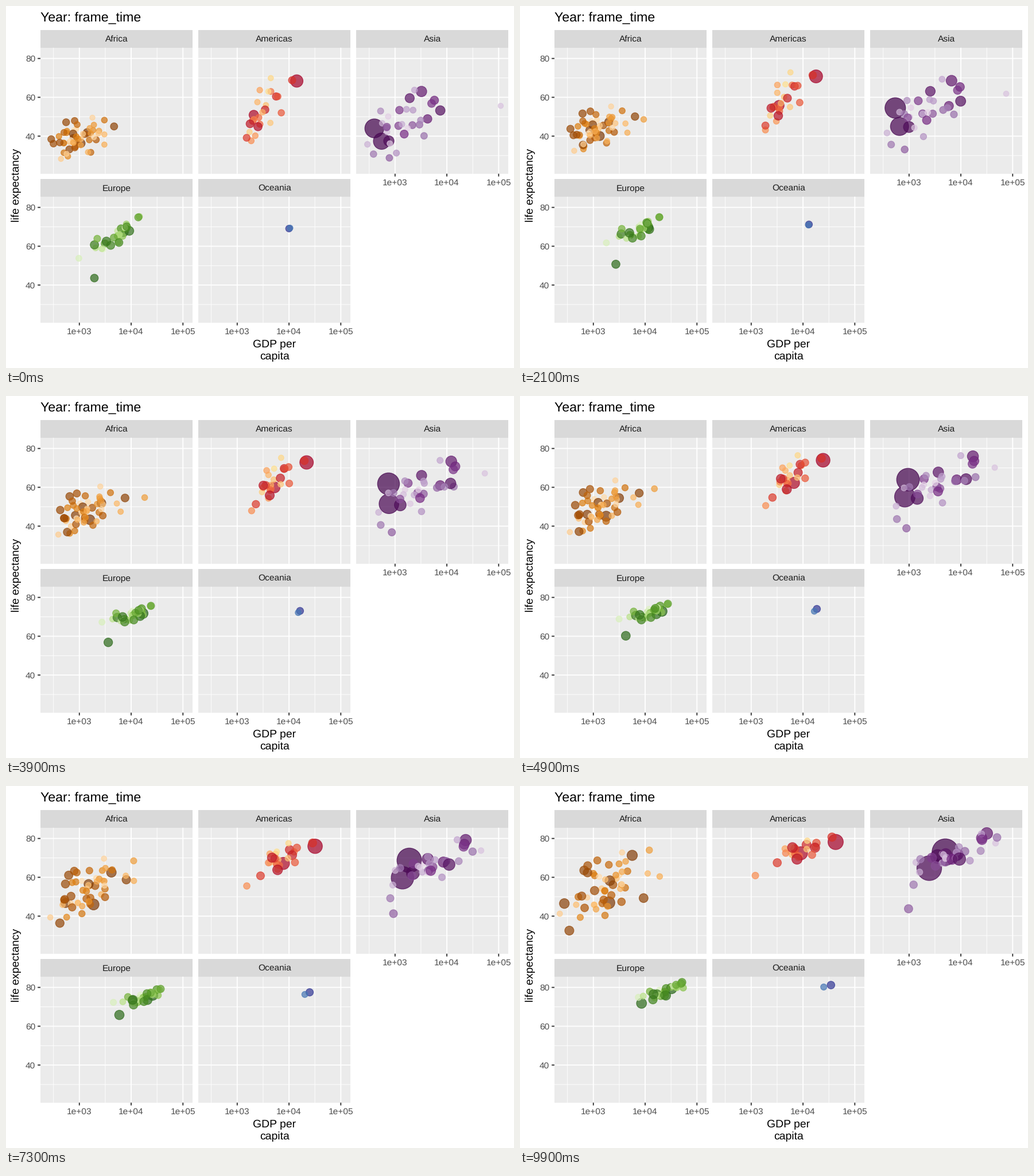
These frames come from a looping animation (885 by 632 pixels, 10000 ms). A matplotlib script:

```python
import matplotlib.pyplot as plt
import numpy as np
from matplotlib.animation import FuncAnimation
from matplotlib.colors import LinearSegmentedColormap
from matplotlib.patches import Rectangle

W, H, DPI = 885, 632, 100
FRAMES, INTERVAL = 100, 100
PT = W / 7 / 72            # pixels per layout point
PX = 72 / DPI              # matplotlib points per pixel
PANEL_W, PANEL_H, STRIP_H = 265.3, 220, 30.4
X_MIN, X_MAX = 2.2487, 5.1887    # log10 of income
Y_MIN, Y_MAX = 20.65, 85.55
MAX_POP = 1319                   # millions
DRIFT = 0.7                      # how far dots wander within their cloud


def glide(t, points):
    """Position at t on a path of evenly timed points."""
    points = np.array(points)
    when = np.linspace(0, 1, len(points))
    return np.array([np.interp(t, when, col) for col in points.T])


def dot_size(pop):
    return 2 + 10 * np.sqrt(pop / MAX_POP)


class Panel:
    def __init__(self, name, col, row, colors, count):
        self.name, self.count = name, count
        self.left, self.top = 60 + 275 * col, 72.8 + 260 * row
        self.ramp = LinearSegmentedColormap.from_list(name, colors.split(), 1024)
        self.leads, self.ranks, self.sizes = [], [], []
        self.cloud = None

    def add_dot(self, rank, pop0, pop1):
        self.ranks.append(rank)
        self.sizes.append((dot_size(pop0), dot_size(pop1)))

    def lead(self, rank, pop0, pop1, *path):
        """A dot with its own path of (log income, life expectancy)."""
        self.add_dot(rank, pop0, pop1)
        self.leads.append(path)

    def fill(self, seed, top_pop, decay, growth, *stats):
        """The other dots; stats are (mean x, sd x, mean y, sd y, correlation)."""
        rng = np.random.default_rng(seed)
        rest = [r for r in range(self.count) if r not in self.ranks]
        for rank in rng.permutation(rest):
            pop = top_pop * np.exp(-decay * rank / (self.count - 1))
            self.add_dot(rank, pop / growth, pop)
        z = rng.normal(size=(2, 2, len(rest)))
        z -= z.mean(axis=2, keepdims=True)
        z /= z.std(axis=2, keepdims=True)
        self.cloud = np.clip(z, -1.9, 1.9), stats

    def colors(self):
        return [(*self.ramp(r / (self.count - 1))[:3], 0.7) for r in self.ranks]

    def spots(self, t):
        xy = np.array([glide(t, path) for path in self.leads])
        if self.cloud:
            (start, end), stats = self.cloud
            zx, zy = start * np.cos(DRIFT * t) + end * np.sin(DRIFT * t)
            mx, sx, my, sy, rho = glide(t, stats)
            life = my + sy * (rho * zx + np.sqrt(1 - rho ** 2) * zy)
            xy = np.vstack([xy, np.column_stack([mx + sx * zx, life])])
        return np.column_stack([self.to_x(xy[:, 0]), self.to_y(xy[:, 1])])

    def diameters(self, t):
        size = np.array(self.sizes) @ [1 - t, t]
        return 0.75 * (size * 2.845 + 0.945) * PT

    def to_x(self, log_gdp):
        return self.left + (log_gdp - X_MIN) / (X_MAX - X_MIN) * PANEL_W

    def to_y(self, life):
        return self.top + (Y_MAX - life) / (Y_MAX - Y_MIN) * PANEL_H


africa = Panel("Africa", 0, 0, "#7F3B08 #B35806 #E08214 #FDB863 #FEE0B6", 52)
africa.lead(0, 33, 135, (3.03, 36.3), (3.25, 45.2), (3.30, 46.9))
africa.lead(1, 22, 80, (3.15, 41.9), (3.50, 54.6), (3.75, 71.3))
africa.lead(3, 14, 65, (2.89, 39.1), (2.95, 45.3), (2.81, 46.8), (2.44, 46.5))
africa.lead(4, 14, 44, (3.67, 45), (3.88, 53), (3.89, 61.3), (3.97, 49.3))
africa.lead(32, 1, 6, (3.38, 42.7), (4.31, 52), (4.04, 67), (4.08, 74))
africa.fill(4, 80, 5.5, 3.6, (2.97, .27, 39, 5, .25), (3.09, .29, 46.2, 5.5, .35),
            (3.12, .34, 53.2, 7, .5), (3.21, .4, 54.8, 8.8, .4))

americas = Panel("Americas", 1, 0, "#A50026 #D73027 #F46D43 #FDAE61 #FEE090", 25)
americas.lead(0, 158, 301, (4.15, 68.4), (4.39, 74), (4.63, 78.2))
americas.lead(1, 57, 190, (3.32, 50.9), (3.83, 62.4), (3.96, 72.4))
americas.lead(6, 15, 33, (4.06, 68.8), (4.36, 75), (4.56, 80.7))
americas.lead(15, 3, 8.5, (3.27, 37.6), (3.28, 50.7), (3.08, 60.9))
americas.fill(9, 120, 4.7, 2.7, (3.49, .19, 52.9, 8.2, .45),
              (3.75, .18, 66, 5.5, .6), (3.92, .22, 73.8, 3.2, .6))

asia = Panel("Asia", 2, 0, "#40004B #762A83 #9970AB #C2A5CF #E7D4E8", 33)
asia.lead(0, 556, 1319, (2.60, 44), (2.81, 60.5), (3.16, 67.6), (3.70, 73))
asia.lead(1, 372, 1110, (2.74, 37.4), (2.92, 55.3), (3.39, 64.7))
asia.lead(2, 82, 223, (2.88, 37.5), (3.16, 54.5), (3.55, 70.7))
asia.lead(5, 86, 127, (3.51, 63), (4.24, 76.1), (4.50, 82.6))
asia.lead(14, 8, 32, (2.89, 28.8), (2.95, 39), (2.99, 43.8))
asia.lead(29, .2, 2.5, (5.04, 55.6), (4.65, 70.3), (4.67, 77.6))
asia.fill(5, 250, 4.8, 2.8, (3.17, .37, 47.2, 8.5, .45),
          (3.56, .46, 62, 7.2, .65), (3.83, .45, 71.2, 5.8, .8))

europe = Panel("Europe", 0, 1, "#276419 #4D9221 #7FBC41 #B8E186 #E6F5D0", 30)
europe.lead(0, 69, 82, (3.85, 67.5), (4.33, 72.9), (4.51, 79.4))
europe.lead(1, 22, 71, (3.29, 43.6), (3.63, 60.4), (3.93, 71.8))
europe.lead(27, 3, 4.5, (2.99, 53.8), (3.40, 66.3), (3.60, 71.6), (3.87, 74.9))
europe.fill(2, 75, 4.2, 1.3, (3.72, .23, 65.6, 4.4, .85), (3.99, .2, 70.5, 2.3, .7),
            (4.20, .2, 74.2, 2.3, .8), (4.38, .22, 78, 2.5, .85))

oceania = Panel("Oceania", 1, 1, "#313695 #4575B4", 2)
oceania.lead(0, 8.7, 20, (4.00, 69.1), (4.27, 74.1), (4.54, 81.2))
oceania.lead(1, 2, 4.1, (4.02, 69.4), (4.22, 72.9), (4.40, 80.2))

panels = africa, americas, asia, europe, oceania

plt.rcParams["font.family"] = "Liberation Sans"
plt.rcParams["text.hinting"] = "none"
fig = plt.figure(figsize=(W / DPI, H / DPI), dpi=DPI, facecolor="white")
ax = fig.add_axes([0, 0, 1, 1])
ax.set(xlim=(0, W), ylim=(H, 0))
ax.axis("off")


def box(x, y, w, h, color):
    ax.add_patch(Rectangle((x, y), w, h, fc=color, lw=0, zorder=1))


def line(xs, ys, width, color):
    ax.plot(xs, ys, color=color, lw=width * PX, zorder=2,
            solid_capstyle="butt", snap=False)


def text(x, y, s, size, color="black", ha="center", rotation=0):
    ax.text(x, y, s, fontsize=size * PT * PX, color=color, ha=ha,
            va="baseline", rotation=rotation, rotation_mode="anchor")


def draw_panel(p):
    right, bottom = p.left + PANEL_W, p.top + PANEL_H
    box(p.left, p.top - STRIP_H, PANEL_W, STRIP_H, "#D9D9D9")
    box(p.left, p.top, PANEL_W, PANEL_H, "#EBEBEB")
    text(p.left + PANEL_W / 2, p.top - 9.5, p.name, 8.8, "#1A1A1A")
    grids = (0.94, (2.5, 3.5, 4.5), (30, 50, 70)), (1.87, (3, 4, 5), (40, 60, 80))
    for width, xs, ys in grids:
        for v in ys:
            line([p.left, right], [p.to_y(v)] * 2, width, "white")
        for v in xs:
            line([p.to_x(v)] * 2, [p.top, bottom], width, "white")
    if p in (africa, europe):
        for v in (40, 60, 80):
            y = p.to_y(v)
            line([p.left - 4.83, p.left], [y, y], 1.87, "#333333")
            text(p.left - 8.7, y + 5.6, str(v), 8.8, "#4D4D4D", "right")
    if p in (asia, europe, oceania):
        for v in (3, 4, 5):
            x = p.to_x(v)
            line([x, x], [bottom, bottom + 4.83], 1.87, "#333333")
            text(x, bottom + 20.2, f"1e+0{v}", 8.8, "#4D4D4D")


for p in panels:
    draw_panel(p)
text(60, 27, "Year: frame_time", 13.2, ha="left")
text(467.6, 596.2, "GDP per", 11)
text(467.6, 616.9, "capita", 11)
text(23.2, 313, "life expectancy", 11, rotation=90)

colors = [c for p in panels for c in p.colors()]
origin = np.zeros(len(colors))
dots = ax.scatter(origin, origin, c=colors, lw=1.24 * PX, zorder=3)
dots.set_edgecolor(colors)


def update(i):
    t = i / (FRAMES - 1)
    dots.set_offsets(np.vstack([p.spots(t) for p in panels]))
    diameters = np.concatenate([p.diameters(t) for p in panels])
    dots.set_sizes((diameters * PX) ** 2, DPI)
    return (dots,)


anim = FuncAnimation(fig, update, frames=FRAMES, interval=INTERVAL,
                     repeat=True, repeat_delay=0)
plt.show()
```
